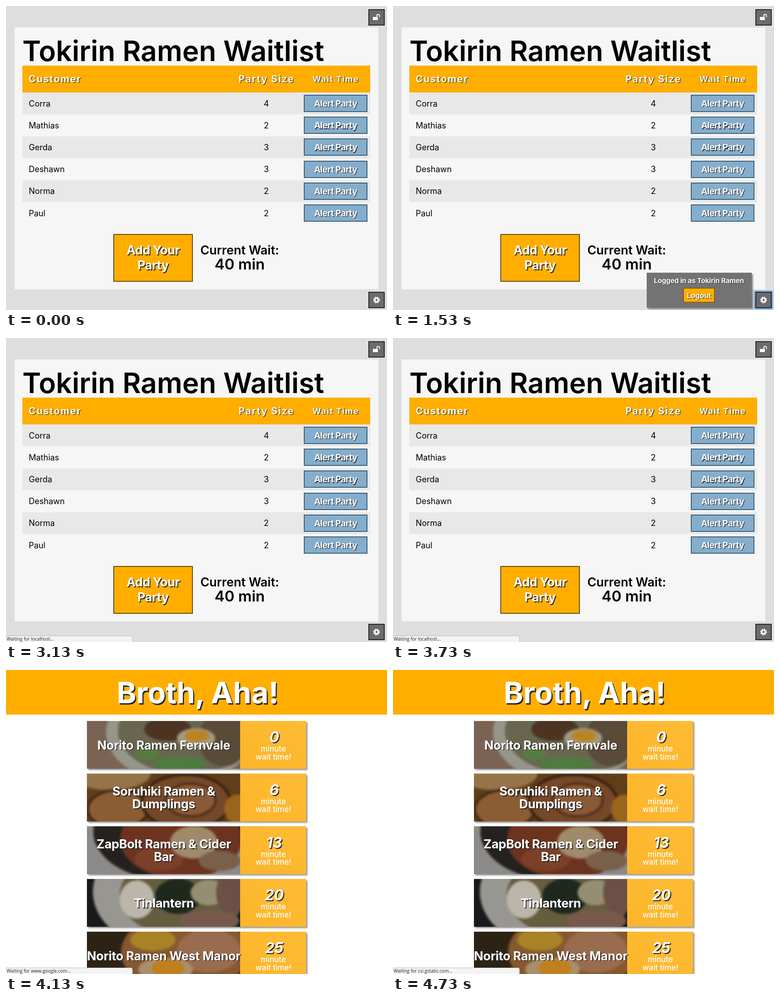
An HTML page that plays this animation: 838 px wide and 668 px high, repeating every 4.79 s.

```html
<!DOCTYPE html>
<html lang="en">
<head>
<meta charset="utf-8">
<title>Waitlist logout</title>
<style>
  html, body { margin: 0; width: 100%; height: 100%; overflow: hidden; background: #dedede; }
  svg { display: block; font-family: Inter, sans-serif; font-optical-sizing: none; }
  .soft { filter: drop-shadow(3px 3px 1.5px #0006); }
  .photo { filter: blur(2.5px); }
</style>
</head>
<body>
<svg id="stage" width="838" height="668" viewBox="0 0 838 668"></svg>
<script>
const LOOP = 4790;
const ORANGE = '#ffae00';
const stage = document.getElementById('stage');

const rect = (x, y, w, h, fill, extra = '') =>
  `<rect x="${x}" y="${y}" width="${w}" height="${h}" fill="${fill}" ${extra}/>`;

const boxed = (x, y, w, h, fill, border) =>
  rect(x + 1, y + 1, w - 2, h - 2, fill, `stroke="${border}" stroke-width="2"`);

const blob = (cx, cy, rx, ry, fill, extra = '') =>
  `<ellipse cx="${cx}" cy="${cy}" rx="${rx}" ry="${ry}" fill="${fill}" ${extra}/>`;

// Text with an optional hard drop shadow of the given offset.
function text(str, x, y, size, { weight = 700, fill = '#fff', anchor = 'middle', gap = 0, shadow = 0, style = 'normal' } = {}) {
  const draw = (dx, color) => `<text x="${x + dx}" y="${y + dx}" font-size="${size}" font-weight="${weight}"
    font-style="${style}" letter-spacing="${gap}" text-anchor="${anchor}" fill="${color}">${str.replace('&', '&amp;')}</text>`;
  return (shadow ? draw(shadow, '#222') : '') + draw(0, fill);
}

function iconButton(y, icon) {
  return boxed(797, y, 36, 36, '#6b6b6b', '#262626') + icon;
}

function waitlist() {
  const guests = [['Corra', 4], ['Mathias', 2], ['Gerda', 3], ['Deshawn', 3], ['Norma', 2], ['Paul', 2]];
  const dark = { fill: '#000', weight: 400 };
  const rows = guests.map(([name, size], i) => {
    const y = 190 + i * 48.2;
    return (i % 2 ? '' : rect(36, y, 765, 48.2, '#e8e8e8'))
      + text(name, 50, y + 30.5, 18, { ...dark, anchor: 'start' })
      + text(String(size), 572.5, y + 30.5, 18, dark)
      + boxed(655, Math.round(y + 5), 140, 38, '#85adcc', '#3b6178')
      + text('Alert Party', 725, y + 31, 19, { gap: -0.5, shadow: 1.3 });
  }).join('');
  const lock = rect(807, 24, 11, 7, '#fff', 'rx="1"')
    + '<path d="M815.5 24v-2.5a3 3 0 0 1 6 0v3" fill="none" stroke="#fff" stroke-width="1.8"/>';
  const gear = `<g fill="none" stroke="#fff"><circle cx="815" cy="646" r="4" stroke-width="3.2"/>
    <circle cx="815" cy="646" r="6.2" stroke-width="2.4" stroke-dasharray="2.6 2.27"/></g>`;

  return rect(0, 0, 838, 668, '#dedede') + rect(19, 47, 800, 575.5, '#f6f6f6')
    + text('Tokirin Ramen Waitlist', 36, 121, 62, { weight: 600, fill: '#000', anchor: 'start' })
    + rect(36, 131, 765, 59, ORANGE)
    + text('Customer', 50, 168, 21, { anchor: 'start', gap: 1.9, shadow: 1.2 })
    + text('Party Size', 573, 168, 21, { gap: 1.9, shadow: 1.2 })
    + text('Wait Time', 725.5, 167, 18, { gap: 1.6, shadow: 1.2 })
    + rows
    + boxed(236, 501, 175, 105, ORANGE, '#6a4a08')
    + text('Add Your', 323.5, 546, 27, { gap: -0.5, shadow: 1.8 })
    + text('Party', 323.5, 579, 27, { gap: -0.5, shadow: 1.8 })
    + text('Current Wait:', 514, 546, 27, { weight: 600, fill: '#000' })
    + text('40 min', 514, 579, 33, { weight: 600, fill: '#000' })
    + iconButton(7, lock)
    + '<rect id="ring" x="796" y="627" width="38" height="38" rx="2" fill="none" stroke="#79aee4" stroke-width="4"/>'
    + iconButton(628, gear)
    + `<g id="popup"><g class="soft">${rect(558, 586, 231, 77, '#737373')}</g>`
    + text('Logged in as Tokirin Ramen', 673, 609, 15, { gap: -0.1, shadow: 0.8 })
    + boxed(638, 619, 70, 33, ORANGE, '#8a6114')
    + text('Logout', 673, 641.5, 16, { gap: -0.3, shadow: 1 }) + '</g>';
}

// Loose impressions of bowls, in card coordinates.
const backdrop = fill => rect(-20, -20, 377, 145, fill);
const photos = [
  backdrop('#7a6353') + blob(205, 25, 163, 112, '#96958a') + blob(220, 22, 152, 95, '#69664f')
    + blob(178, 18, 52, 26, '#4b3522') + blob(300, 40, 55, 60, '#5a4b39') + blob(240, 38, 42, 22, '#a29880')
    + blob(242, 33, 27, 13, '#b98524') + blob(203, 94, 58, 15, '#4d7c3e') + blob(133, 72, 26, 14, '#567b40'),
  backdrop('#5f3f19') + blob(50, 0, 90, 36, '#96744a')
    + blob(68, 78, 66, 42, '#8c5d33', 'stroke="#3d2413" stroke-width="5"')
    + blob(218, 62, 97, 60, '#75482a', 'stroke="#3a2010" stroke-width="6"')
    + blob(228, 58, 55, 36, '#8a5a37', 'stroke="#4d2c18" stroke-width="5"') + blob(330, 78, 28, 32, '#9a661d'),
  backdrop('#8c8b89') + blob(180, 12, 166, 106, '#24211f') + blob(207, 28, 134, 88, '#6c331f')
    + blob(158, 72, 54, 26, '#7c4029') + blob(235, 35, 52, 36, '#a08a6c') + blob(292, 76, 46, 22, '#79604b'),
  backdrop('#17191b') + blob(174, 28, 161, 124, '#989690') + blob(210, 35, 138, 92, '#655d3e')
    + blob(110, 45, 38, 42, '#bcb5aa') + blob(200, 38, 50, 39, '#1e281d') + blob(268, 30, 40, 28, '#968e74')
    + blob(318, 30, 34, 48, '#6c5045') + blob(270, 92, 65, 24, '#775a4c'),
  backdrop('#2d2314') + blob(215, 45, 140, 90, '#85582e') + blob(145, 18, 50, 24, '#a88226')
    + blob(268, 42, 70, 48, '#996c4e') + blob(173, 83, 60, 26, '#a98f6e') + blob(178, 80, 36, 20, '#c1801f'),
];

function home() {
  const cards = [
    [['Norito Ramen Fernvale'], 0],
    [['Soruhiki Ramen &', 'Dumplings'], 6],
    [['ZapBolt Ramen & Cider', 'Bar'], 13],
    [['Tinlantern'], 20],
    [['Norito Ramen West Manor'], 25],
  ];
  return rect(0, 0, 838, 668, '#fff') + rect(0, 0, 838, 98, ORANGE)
    + text('Broth, Aha!', 421.5, 73, 65, { shadow: 2.5 })
    + cards.map(([lines, wait], i) => {
      const y = 112 + i * 115.75;
      const first = y + (lines.length > 1 ? 48.5 : 62.5);
      return `<g class="soft">${rect(178, y, 482, 105, '#a3a3a3')}</g>`
        + `<svg class="photos" x="178" y="${y}" width="337" height="105"><g class="photo">${photos[i]}</g></svg>`
        + rect(515, y, 145, 105, 'url(#amber)')
        + lines.map((line, n) => text(line, 347, first + n * 28, 27, { gap: -0.3, shadow: 1.8 })).join('')
        + text(String(wait), 590, y + 47, 32, { style: 'italic', shadow: 2 })
        + text('minute', 588, y + 67, 17, { weight: 500 })
        + text('wait time!', 588, y + 84.5, 17, { weight: 500 });
    }).join('');
}

stage.innerHTML = `
  <defs><linearGradient id="amber" x1="0" y1="1" x2="1" y2="0">
    <stop stop-color="#fdb52a"/><stop offset="1" stop-color="#fdbc35"/></linearGradient></defs>
  <g id="waitlist">${waitlist()}</g>
  <g id="home">${home()}</g>
  <g id="status">
    <rect x="-4" y="654.5" width="282" height="20" rx="3" fill="#f4f4f4" stroke="#b9b9b9"/>
    <text id="message" x="1.5" y="665" font-size="10" font-family="Open Sans, sans-serif" fill="#222"></text>
  </g>`;

const el = id => document.getElementById(id);
const show = (node, on) => { node.style.display = on ? '' : 'none'; };
const ramp = (t, from, to) => Math.min(1, Math.max(0, (t - from) / (to - from)));

const messages = [
  [0, ''],
  [1930, 'localhost:3000/admins/sign_out'],
  [2870, 'Waiting for localhost...'],
  [4000, 'Waiting for www.google.com...'],
  [4470, 'Waiting for csi.gstatic.com...'],
];

function render(t) {
  const message = messages.filter(([start]) => t >= start).pop()[1];
  show(el('waitlist'), t < 3800);
  show(el('home'), t >= 3800);
  show(el('ring'), t >= 470 && t < 2400);
  el('popup').style.opacity = ramp(t, 470, 800) - ramp(t, 2760, 3100);
  document.querySelectorAll('.photos').forEach(photo => show(photo, t >= 4000));
  show(el('status'), message);
  el('message').textContent = message;
}

const start = performance.now();
function tick() {
  render((performance.now() - start) % LOOP);
  requestAnimationFrame(tick);
}
tick();
</script>
</body>
</html>
```
